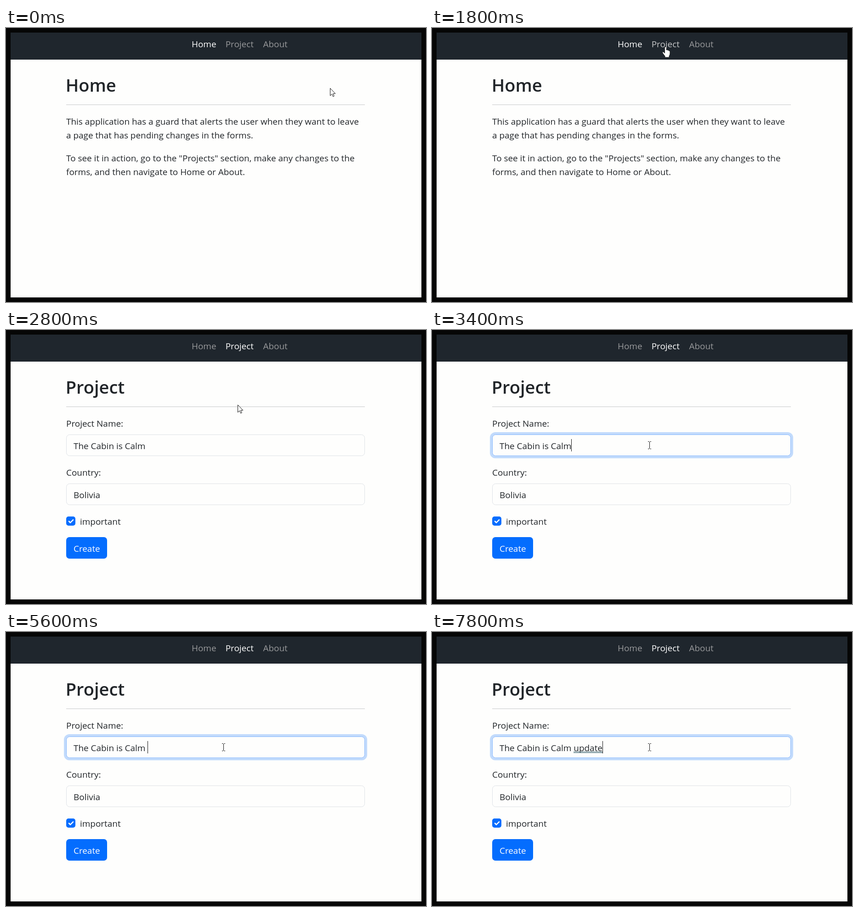
Write an HTML page that moves like this. It is 914 px wide and 598 px high and loops after 8 s.

```html
<!DOCTYPE html>
<html lang="en">
<head>
<meta charset="utf-8">
<title>Unsaved changes guard</title>
<style>
  html, body { margin: 0; width: 100%; height: 100%; overflow: hidden; background: #060606; }
  svg { display: block; width: 914px; height: 598px; }
  text { font: 18.92px "Open Sans", "Noto Sans", sans-serif; fill: #212529; white-space: pre; }
  .title { font-size: 38px; font-weight: 600; }
  .box { fill: #fefefd; stroke: #dee2e6; }
  .box.focus { stroke: #86b7fe; }
  .light { fill: #fff; }
  .blue { fill: #046dfe; }
</style>
</head>
<body>
<svg viewBox="0 0 914 598">
  <rect width="914" height="598" fill="#060606"/>
  <rect x="10" y="10" width="894" height="578" fill="#fefefd"/>
  <rect x="10" y="10" width="894" height="59" fill="#1f262d"/>
  <text id="navHome" x="404" y="42">Home</text>
  <text id="navProject" x="477.7" y="42">Project</text>
  <text id="navAbout" x="559.5" y="42">About</text>
  <rect x="131" y="167" width="650" height="1" fill="#c7c8c9"/>

  <g id="home">
    <text class="title" x="129.7" y="139">Home</text>
    <text x="131" y="211">This application has a guard that alerts the user when they want to leave</text>
    <text x="131" y="241">a page that has pending changes in the forms.</text>
    <text x="131" y="291">To see it in action, go to the "Projects" section, make any changes to the</text>
    <text x="131" y="321">forms, and then navigate to Home or About.</text>
  </g>

  <g id="project">
    <text class="title" x="129.7" y="139">Project</text>
    <text x="131" y="211">Project Name:</text>
    <rect id="ring" x="126" y="223" width="660" height="57" rx="12" fill="#c2dbfc"/>
    <rect id="nameBox" class="box" x="131.5" y="228.5" width="649" height="46" rx="7"/>
    <text id="name" x="147" y="260"></text>
    <path id="underline" fill="none" stroke="#3f6672"/>
    <rect id="caret" y="238" width="1" height="27" fill="#111"/>
    <text x="131" y="318">Country:</text>
    <rect class="box" x="131.5" y="335.5" width="649" height="46" rx="7"/>
    <text x="147" y="367">Bolivia</text>
    <rect class="blue" x="131" y="407" width="20" height="20" rx="5"/>
    <path d="M137 417.5l3 3 6-6.200" fill="none" stroke="#fff" stroke-width="2.5" stroke-linecap="round" stroke-linejoin="round"/>
    <text x="161" y="425">important</text>
    <rect class="blue" x="131" y="452" width="89" height="47" rx="7"/>
    <text class="light" x="147" y="484">Create</text>
  </g>

  <g id="pointer">
    <path id="arrow" d="M.5.5V16.700L4.300 13.200L6.700 18.700L9.100 17.700L6.800 12.200H11.700Z" fill="#fff" stroke="#111"/>
    <path id="hand" d="M-1.500 1.500Q-1.500 0 .2 0T2 1.500V7Q4.300 5.900 5 7.800Q7 6.900 7.600 8.800Q9.700 8.200 9.900 10.500V15Q9.700 18 8 20V23H-1V20.500L-5.800 14Q-7.300 11.500-5.300 11Q-3.500 11-1.500 14Z" fill="#fff" stroke="#111" stroke-width=".8"/>
    <path id="beam" d="M-3-7.500H-.5M1.500-7.500H4M.5-7V8M-3 8.500H-.5M1.500 8.500H4" fill="none" stroke="#111"/>
  </g>
</svg>
<script>
const LOOP = 8000;
const BASE = "The Cabin is Calm";
const NAME_X = 147;
const el = id => document.getElementById(id);

// [start ms, x, y, pointer shape]
const moves = [
  [0, 705, 131, "arrow"], [200, 696, 127, "arrow"], [400, 662, 112, "arrow"],
  [600, 606, 87, "arrow"], [800, 552, 63, "hand"], [1000, 520, 48, "hand"],
  [1200, 511, 43, "hand"], [1400, 509, 42, "hand"], [1600, 508, 41, "hand"],
  [2400, 508, 46, "hand"], [2600, 507, 108, "arrow"], [2800, 504, 163, "arrow"],
  [3000, 481, 238, "beam"], [3200, 473, 251, "beam"]
];
// [start ms, text after the base name]
const typing = [
  [0, ""], [4400, " "], [6000, " u"], [6200, " upd"],
  [6400, " upda"], [6600, " updat"], [6800, " update"]
];
// [start ms, caret visible]
const blinks = [
  [0, false], [3200, true], [3800, false], [4400, true], [5000, false],
  [5600, true], [7200, false], [7800, true]
];
const OPEN_PROJECT = 2000, FOCUS = 3200, CHECKED = 7400;

const at = (steps, t) => steps.findLast(s => s[0] <= t);
const show = (id, on) => el(id).setAttribute("visibility", on ? "inherit" : "hidden");

function navColor(id, active, hover) {
  el(id).style.fill = active ? "#fff" : hover ? "#c6c7c8" : "#98999b";
}

function typedWidth(text) {
  el("name").textContent = text;
  return el("name").getComputedTextLength();
}

function draw(t) {
  const onProject = t >= OPEN_PROJECT;
  const focused = t >= FOCUS;
  const [, x, y, shape] = at(moves, t);

  el("home").style.display = onProject ? "none" : "";
  el("project").style.display = onProject ? "" : "none";
  navColor("navHome", !onProject, false);
  navColor("navProject", onProject, shape === "hand");
  navColor("navAbout", false, false);

  el("pointer").setAttribute("transform", `translate(${x} ${y})`);
  for (const id of ["arrow", "hand", "beam"]) show(id, id === shape);

  show("ring", focused);
  el("nameBox").classList.toggle("focus", focused);
  show("caret", at(blinks, t)[1]);
  show("underline", t >= CHECKED);

  if (onProject) {
    const wordX = Math.round(NAME_X + typedWidth(BASE + " "));
    const endX = Math.round(NAME_X + typedWidth(BASE + at(typing, t)[1]));
    el("caret").setAttribute("x", endX);
    el("underline").setAttribute("d", `M${wordX} 261.500H${endX}M${wordX} 263.500H${endX}`);
  }
}

function tick() {
  draw(performance.now() % LOOP);
  requestAnimationFrame(tick);
}
tick();
</script>
</body>
</html>
```
